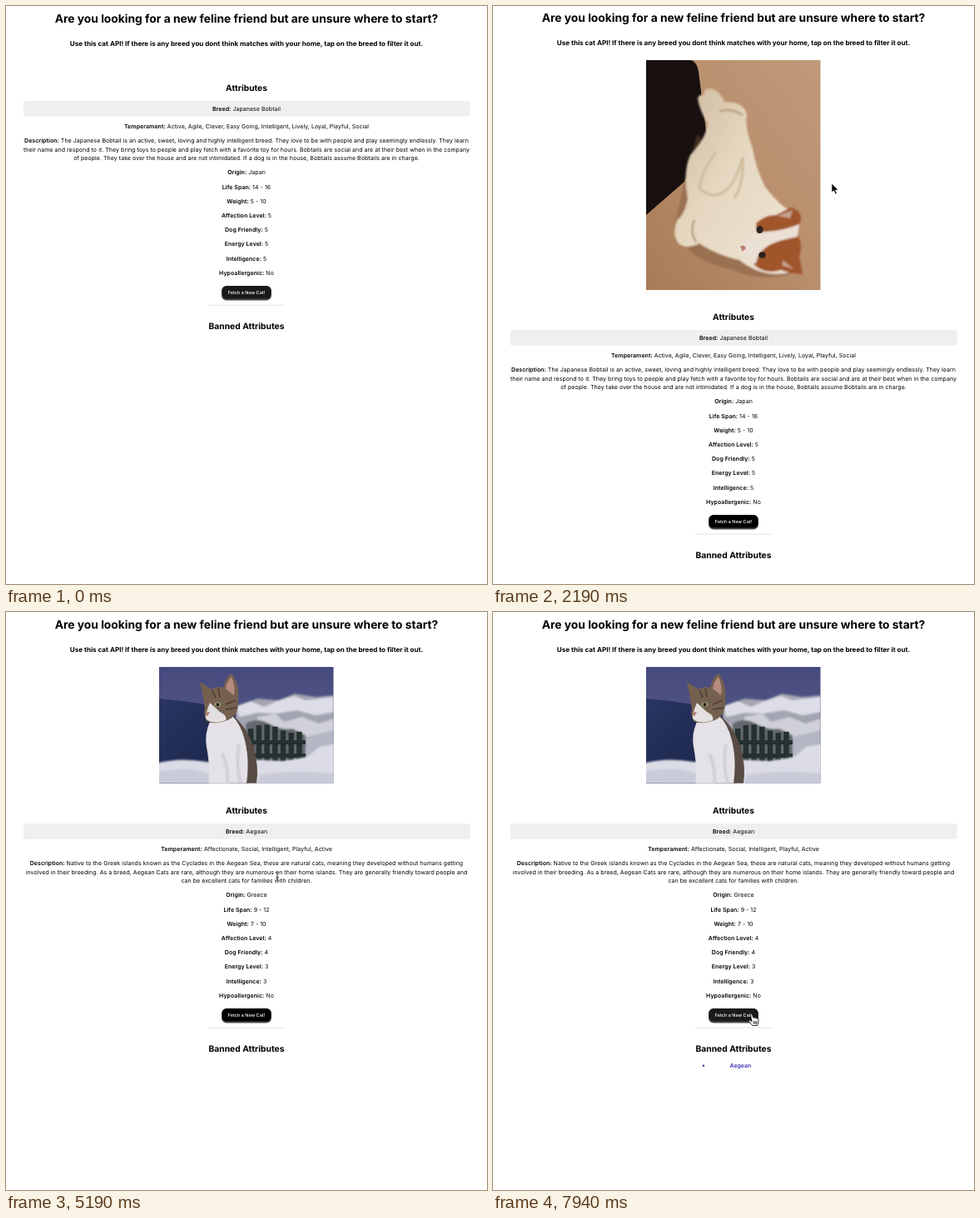
These frames come from a looping animation (578x694 px, 8000 ms). An HTML page:

```html
<!DOCTYPE html>
<html lang="en">
<head>
<meta charset="utf-8">
<title>Cat finder</title>
<style>
  html, body { margin: 0; width: 100%; height: 100%; overflow: hidden; background: #fff; }
  svg { display: block; width: 578px; height: 694px; }
  text {
    font-family: Inter, "Open Sans", sans-serif;
    text-anchor: middle;
    text-rendering: geometricPrecision;
    white-space: pre;
    fill: #000;
  }
  .body { font-size: 7px; letter-spacing: .007em; }
  .head { font-weight: 700; }
  .label { font-weight: 600; }
  .cta { font-size: 5.5px; font-weight: 500; fill: #fff; }
  .banned { font-size: 6.9px; font-weight: 600; fill: #3a30b4; }
</style>
</head>
<body>
<svg viewBox="0 0 578 694">
  <defs>
    <linearGradient id="carpet" x1="0" y1="1" x2="1" y2="0">
      <stop offset="0" stop-color="#a97a56"/>
      <stop offset=".5" stop-color="#b98e6c"/>
      <stop offset="1" stop-color="#bf9a79"/>
    </linearGradient>
    <linearGradient id="fur" x1="0" y1="0" x2="1" y2="1">
      <stop offset="0" stop-color="#cdb89c"/>
      <stop offset=".45" stop-color="#e6d8c1"/>
      <stop offset="1" stop-color="#eee4d6"/>
    </linearGradient>
    <linearGradient id="sky" x1="0" y1="0" x2="0" y2="1">
      <stop offset="0" stop-color="#46497d"/>
      <stop offset="1" stop-color="#60658f"/>
    </linearGradient>
    <linearGradient id="sea" x1="0" y1="0" x2="1" y2="1">
      <stop offset="0" stop-color="#2a3563"/>
      <stop offset="1" stop-color="#172244"/>
    </linearGradient>
    <filter id="soft"><feGaussianBlur stdDeviation="1.1"/></filter>
    <clipPath id="tall"><path d="M0 0H209.5V276H0Z"/></clipPath>
    <clipPath id="wide"><path d="M0 0H209.5V139.5H0Z"/></clipPath>
  </defs>

  <g id="page">
    <g id="top"></g>

    <g id="lying" transform="translate(184 66)" clip-path="url(#tall)">
      <path d="M0 0H210V276H0Z" fill="url(#carpet)"/>
      <path d="M0 0H54Q61 2 63 14L73 92L46 146L0 186Z" fill="#17100f"/>
      <g filter="url(#soft)">
        <path d="M62 88L50 128L34 200Q46 240 105 252Q140 268 180 255L140 230Z" fill="#7d573c" opacity=".45"/>
        <path d="M70 42Q68 34 78 34Q90 38 94 50Q119 50 121 66Q118 80 128 106Q132 130 143 152Q160 174 172 180Q184 230 172 255Q140 262 112 240Q84 234 64 220Q48 228 39 220Q30 208 38 191Q46 186 50 166Q44 134 53 114Q72 94 74 76Q64 60 62 46Q64 40 70 42Z" fill="url(#fur)"/>
        <path d="M84 110Q66 136 64 154Q84 172 102 150Q112 134 116 116Q118 148 106 166" fill="none" stroke="#d0bb9c" stroke-width="3"/>
        <path d="M88 62Q100 56 116 66M58 192Q52 206 60 218" fill="none" stroke="#b89d7d" stroke-width="2.5"/>
        <path d="M132 196Q142 186 156 186L174 177Q187 180 186 192L181 206Q189 222 184 236L188 257Q172 256 162 252Q144 258 130 246L128 234Q142 226 150 216L134 212Z" fill="#a0552c"/>
        <path d="M111 224Q126 206 146 206Q168 204 184 197L182 212Q160 216 148 222Q134 230 132 244Q118 242 111 224Z" fill="#ebe0d4"/>
        <path d="M158 187L176 180L173 190ZM164 240L178 251L164 247Z" fill="#c6a08a"/>
      </g>
      <ellipse cx="136.500" cy="203.500" rx="4" ry="4.500" fill="#2b241d"/>
      <ellipse cx="139.500" cy="234" rx="4.200" ry="3.800" fill="#2b241d"/>
      <path d="M113 224Q118 220 120 226L116 230Z" fill="#bd816c"/>
    </g>

    <g id="sitting" transform="translate(184 66)" clip-path="url(#wide)">
      <path d="M0 0H210V140H0Z" fill="url(#sky)"/>
      <path d="M0 38Q24 40 50 44L108 52V140H0Z" fill="url(#sea)"/>
      <g filter="url(#soft)">
        <path d="M92 48L118 38L144 40L163 32L188 36L210 34V120H92Z" fill="#a3a4b1"/>
        <path d="M93 47L110 41L126 48L144 40L162 35L176 40L210 36V54L188 58L166 52L140 56L118 55L96 60Z" fill="#dcdde6"/>
        <path d="M118 60L140 56L150 66L172 60L192 68L210 62V86H176L152 78L120 76Z" fill="#cfd0d9"/>
        <path d="M104 68Q118 60 132 68T160 74L176 82V114H104Z" fill="#62686d"/>
        <path d="M176 84L210 76V120H176Z" fill="#b4b6c4"/>
      </g>
      <path id="fence" fill="#24312f"/>
      <g filter="url(#soft)">
        <path d="M-4 116Q24 108 58 114L112 111L148 113L178 108L192 96L214 92V144H-4Z" fill="#dcdce6"/>
        <path d="M-4 126Q40 118 60 128L58 144H-4ZM120 130Q160 122 214 128V144H118Z" fill="#cacbd9"/>
      </g>
      <path d="M88 58Q106 72 114 98Q120 120 117 140H84Z" fill="#584c45"/>
      <path d="M63 62Q54 78 57 96Q61 116 60 140H105Q109 112 103 88Q98 68 87 58Z" fill="#e4e1e7"/>
      <path d="M76 104Q84 122 82 140M96 92Q92 118 98 140" fill="none" stroke="#cac9d5" stroke-width="3" filter="url(#soft)"/>
      <path d="M52 32L49 18L63 27Q70 22 77 25Q80 12 87 8Q97 20 95 38Q97 58 82 64Q66 70 57 65Q53 58 55 50Z" fill="#75604f"/>
      <path d="M80 26Q82 16 87 12Q92 22 90 34Z" fill="#b58b7d"/>
      <path d="M61 43Q56 54 56 62Q64 70 80 64Q82 58 73 54Z" fill="#e4dfe0"/>
      <path d="M64 28L68 37M71 26L73 36M80 45L92 40M80 51L93 49" fill="none" stroke="#4a3c34" stroke-width="1.600"/>
      <ellipse cx="70.500" cy="45" rx="4" ry="3" fill="#8d9162"/>
      <path d="M69 43.500H72V47H69Z" fill="#1c1b18"/>
      <path d="M55 55L61 54L58 59Z" fill="#a8776d"/>
    </g>

    <g id="info">
      <rect id="bar" x="21" y="114" width="536.500" height="18.700" rx="1.500"/>
      <g id="japan"></g>
      <g id="greece"></g>
      <g id="common"></g>
      <rect x="259" y="335.900" width="60" height="17.600" rx="6" fill="#4b484b"/>
      <rect id="button" x="259.600" y="336.100" width="58.800" height="15.400" rx="5.500"/>
      <text class="cta" x="289" y="345.500">Fetch a New Cat!</text>
      <path d="M243 359.200H335.500" stroke="#dedede" stroke-width=".8"/>
      <g id="list">
        <circle cx="253" cy="404.700" r="1.200" fill="#3a30b4"/>
        <text class="banned" x="297.300" y="407">Aegean</text>
      </g>
    </g>
  </g>

  <g id="cursor" stroke-linejoin="round" stroke-linecap="round">
    <path id="arrow" d="M0 0V11L2.600 8.700L4.500 13L6.500 12.100L4.600 8H8Z" fill="#000" stroke="#fff" stroke-width=".8"/>
    <path id="hand" d="M-1.400 1Q-1 -.5 .4 .3L1.700 4.700Q3 3.700 4 5Q5.300 4.200 6 5.500Q7.700 5 8 7L7.700 10.500L6.500 14H.7L-3.700 8.800Q-3.600 7.300 -2 7.600L-.2 9ZM2.300 9.200V11.800M4 9.200V11.800M5.600 9.200V11.800" fill="#fff" stroke="#111" stroke-width=".9"/>
    <g id="beam" fill="none">
      <path d="M-2 -5Q0 -5 0 -3.800Q0 -5 2 -5M0 -4V4M-2 5Q0 5 0 3.800Q0 5 2 5M-1.300 1.500H1.300" stroke="#fff" stroke-width="1.800"/>
      <path d="M-2 -5Q0 -5 0 -3.800Q0 -5 2 -5M0 -4V4M-2 5Q0 5 0 3.800Q0 5 2 5M-1.300 1.500H1.300" stroke="#111" stroke-width=".9"/>
    </g>
  </g>
</svg>

<script>
const LOOP = 8000;
const $ = id => document.getElementById(id);

function svg(tag, attrs, parent, text = '') {
  const el = document.createElementNS('http://www.w3.org/2000/svg', tag);
  for (const name in attrs) el.setAttribute(name, attrs[name]);
  el.textContent = text;
  return parent.appendChild(el);
}

function heading(parent, mid, size, text) {
  svg('text', { class: 'head', x: 289, y: mid + size * .36, 'font-size': size }, parent, text);
}

// A leading "Label:" is set in semibold.
function line(parent, mid, text) {
  const el = svg('text', { class: 'body', x: 289, y: mid + 2.4 }, parent);
  const [, label, rest] = text.match(/^([A-Z][A-Za-z ]*:)?(.*)$/);
  if (label) svg('tspan', { class: 'label' }, el, label);
  svg('tspan', {}, el, rest);
}

const FACT_ROWS = ['Origin', 'Life Span', 'Weight', 'Affection Level', 'Dog Friendly',
  'Energy Level', 'Intelligence', 'Hypoallergenic'];

function breed(parent, name, temperament, description, facts) {
  line(parent, 123.5, 'Breed: ' + name);
  line(parent, 144.8, 'Temperament: ' + temperament);
  description.forEach((s, i) => line(parent, 161.9 + i * 10.5, s));
  FACT_ROWS.forEach((row, i) => line(parent, 200 + i * 17.2, `${row}: ${facts[i]}`));
}

heading($('top'), 15.4, 13.8, 'Are you looking for a new feline friend but are unsure where to start?');
heading($('top'), 44.8, 8.07, 'Use this cat API! If there is any breed you dont think matches with your home, tap on the breed to filter it out.');
heading($('common'), 98.4, 10.2, 'Attributes');
heading($('common'), 383.8, 10.3, 'Banned Attributes');

breed($('japan'), 'Japanese Bobtail',
  'Active, Agile, Clever, Easy Going, Intelligent, Lively, Loyal, Playful, Social', [
    'Description: The Japanese Bobtail is an active, sweet, loving and highly intelligent breed. They love to be with people and play seemingly endlessly. They learn',
    'their name and respond to it. They bring toys to people and play fetch with a favorite toy for hours. Bobtails are social and are at their best when in the company',
    'of people. They take over the house and are not intimidated. If a dog is in the house, Bobtails assume Bobtails are in charge.'
  ], ['Japan', '14 - 16', '5 - 10', 5, 5, 5, 5, 'No']);

breed($('greece'), 'Aegean', 'Affectionate, Social, Intelligent, Playful, Active', [
    'Description: Native to the Greek islands known as the Cyclades in the Aegean Sea, these are natural cats, meaning they developed without humans getting',
    'involved in their breeding. As a breed, Aegean Cats are rare, although they are numerous on their home islands. They are generally friendly toward people and',
    'can be excellent cats for families with children.'
  ], ['Greece', '9 - 12', '7 - 10', 4, 4, 3, 3, 'No']);

let posts = 'M106 88H176V93H106ZM106 104H176V109H106Z';
for (let i = 0; i < 7; i++) {
  const x = 107 + i * 9.7, y = 74 - 5 * Math.sin(i * .9);
  posts += `M${x} ${y}h6.500V114h-6.500Z`;
}
$('fence').setAttribute('d', posts);

// time, x, y, pointer shape from that time on
const PATH = [
  [0, 302, 330, ''],
  [500, 302, 330, 'arrow'],
  [1000, 301, 250, 'arrow'],
  [1130, 301, 250, 'arrow'],
  [1880, 392, 218, 'arrow'],
  [2190, 407, 213, 'arrow'],
  [2690, 384, 245, 'arrow'],
  [3080, 335, 432, 'beam'],
  [3180, 325, 466, 'arrow'],
  [3400, 304, 610, 'hand'],
  [3500, 303, 612.5, 'hand'],
  [4500, 303, 612.5, 'arrow'],
  [5100, 325, 330, 'beam'],
  [5190, 326, 317.5, 'beam'],
  [5310, 326, 317.5, 'beam'],
  [5580, 324, 296, 'arrow'],
  [5800, 322, 272, 'hand'],
  [6000, 321, 266, 'hand'],
  [6690, 321, 266, 'hand'],
  [6760, 321, 274, 'arrow'],
  [6880, 320, 298, 'beam'],
  [7000, 318, 330, 'arrow'],
  [7250, 312, 474, 'hand'],
  [7380, 311, 481, 'hand'],
  [7630, 311, 481, 'hand'],
  [7750, 311, 482.5, 'hand'],
  [LOOP, 311, 482.5, 'hand']
];

const clamp = v => Math.max(0, Math.min(1, v));
const ramp = (t, start, length) => clamp((t - start) / length);
const grey = v => `rgb(${v},${v},${v})`;
const show = (id, on) => { $(id).style.display = on ? '' : 'none'; };

function pointerAt(t) {
  let i = 0;
  while (i < PATH.length - 2 && t >= PATH[i + 1][0]) i++;
  const [t0, x0, y0, shape] = PATH[i], [t1, x1, y1] = PATH[i + 1];
  const k = (t - t0) / (t1 - t0);
  return { x: x0 + (x1 - x0) * k, y: y0 + (y1 - y0) * k, shape };
}

function draw(t) {
  const first = t < 3940;
  const photo = t >= 310;
  show('lying', first && photo);
  show('sitting', !first);
  show('japan', first);
  show('greece', !first);
  show('list', t >= 6130);

  const drop = !photo ? 0 : first ? 276 : 140;
  $('info').setAttribute('transform', `translate(0 ${drop})`);
  const scroll = t >= 1500 && t < 2500 ? -1 : 0;
  $('page').setAttribute('transform', `translate(0 ${scroll})`);

  const buttonHover = 1 - ramp(t, 310, 370)
    + ramp(t, 3400, 150) - ramp(t, 3950, 360) + ramp(t, 7250, 200);
  const barHover = ramp(t, 5800, 180) - ramp(t, 6740, 250);
  $('button').setAttribute('fill', grey(Math.round(26 * clamp(buttonHover))));
  $('bar').setAttribute('fill', grey(Math.round(239 - 10 * barHover)));

  const p = pointerAt(t);
  for (const shape of ['arrow', 'hand', 'beam']) show(shape, p.shape === shape);
  $('cursor').setAttribute('transform', `translate(${p.x} ${p.y})`);
}

const start = performance.now();
function tick() {
  draw((performance.now() - start) % LOOP);
  requestAnimationFrame(tick);
}
tick();
</script>
</body>
</html>
```
